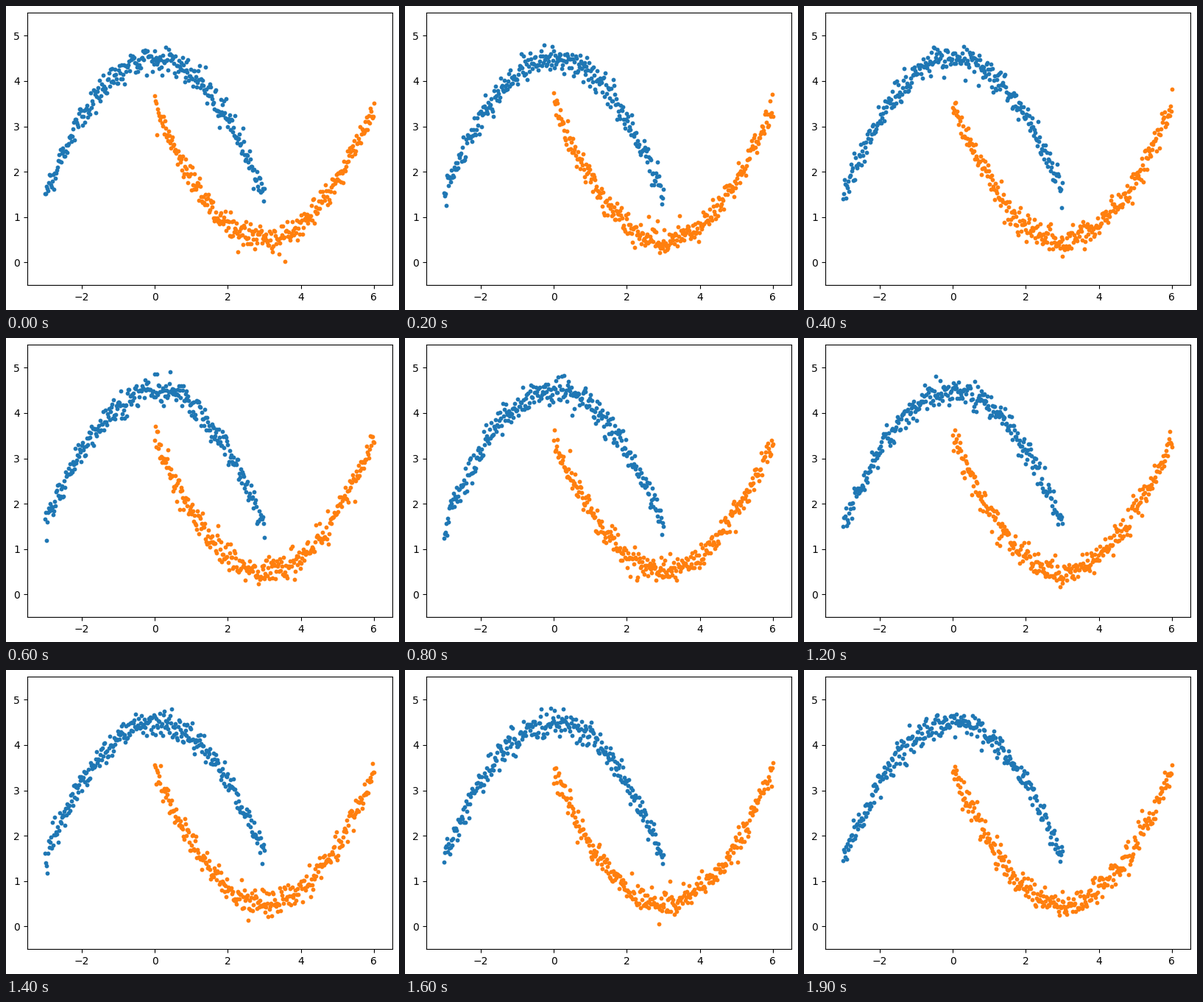
Recreate the animation shown at these times as a matplotlib script. Size 534 by 413 pixels, loop 2400 ms.

```python
import numpy as np
import matplotlib.pyplot as plt
from matplotlib.animation import FuncAnimation

W, H, DPI = 534, 413, 100
POINTS, SPREAD = 300, 0.15
DRAWS, FRAMES, STEP_MS = 20, 24, 100  # the last draw is held to the end

t = np.linspace(-3, 3, POINTS)
ARCH = 4.5 - t**2 / 3
BOWL = 0.5 + t**2 / 3

fig = plt.figure(figsize=(W / DPI, H / DPI), dpi=DPI, facecolor="white")
ax = fig.add_axes([28.6 / W, 33.9 / H, 496 / W, 369.6 / H])
ax.set(xlim=(-3.5, 6.5), ylim=(-0.5, 5.5),
       xticks=range(-2, 7, 2), yticks=range(6))

arch = ax.scatter(t, ARCH, s=10, color="tab:blue")
bowl = ax.scatter(t + 3, BOWL, s=10, color="tab:orange")


def update(i):
    """Scatter both curves with fresh noise, seeded by the draw number."""
    rng = np.random.default_rng(min(i, DRAWS - 1))
    for dots, x, y in ((arch, t, ARCH), (bowl, t + 3, BOWL)):
        noisy = y + rng.normal(0, SPREAD, POINTS)
        dots.set_offsets(np.column_stack([x, noisy]))
    return arch, bowl


anim = FuncAnimation(fig, update, frames=FRAMES, interval=STEP_MS,
                     init_func=lambda: update(0), repeat=True, repeat_delay=0)
plt.show()
```
